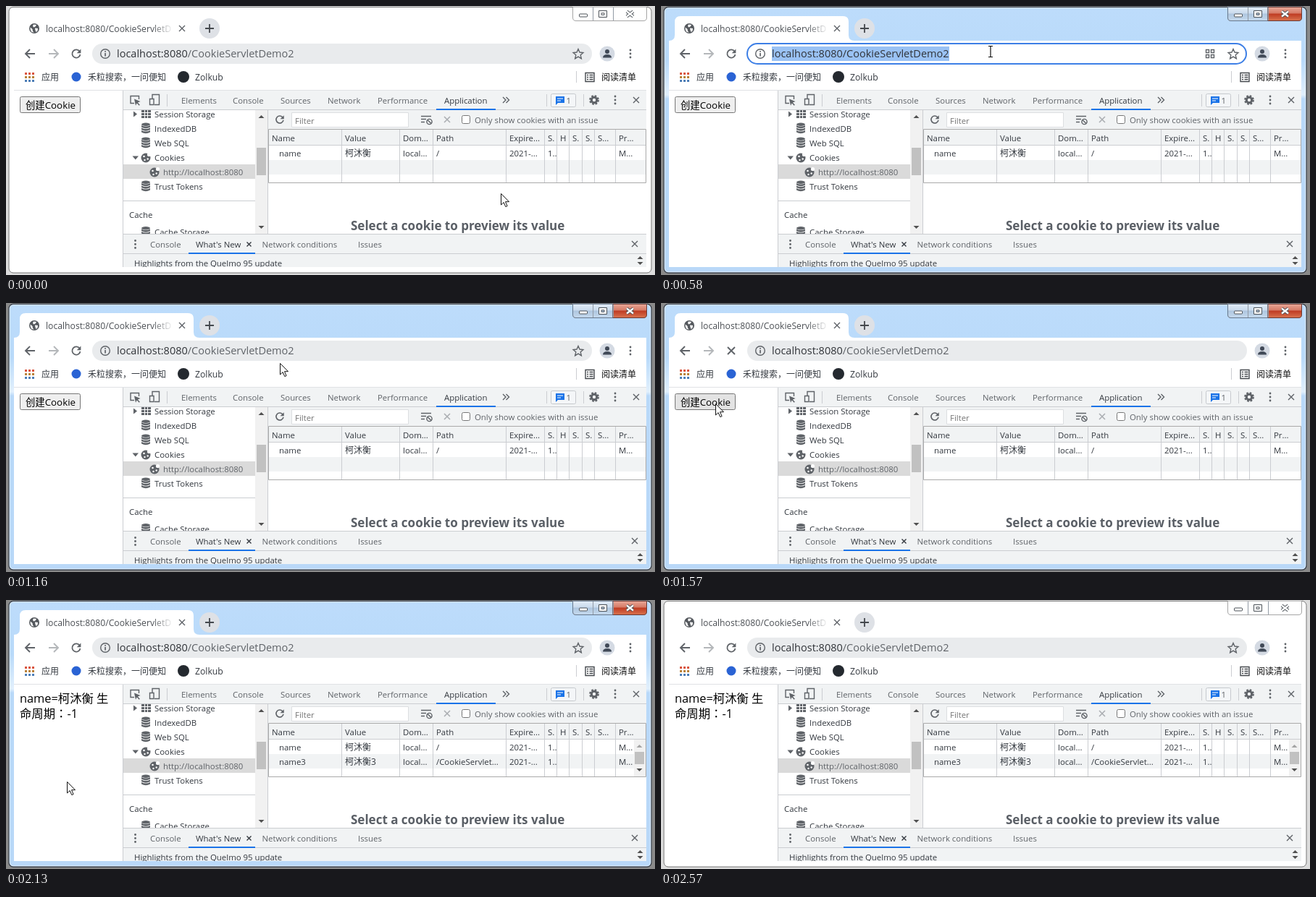
Write an HTML page that moves like this. It is 896 by 372 pixels and loops after 2.65 s.

```html
<!DOCTYPE html>
<html lang="zh-CN">
<head>
<meta charset="utf-8">
<title>Cookie demo</title>
<style>
html, body { margin: 0; width: 100%; height: 100%; overflow: hidden; background: #fff; }
svg { display: block; width: 100%; height: 100%; }
text { font: 11.4px "Open Sans", "Noto Sans CJK SC", "Noto Sans CJK", sans-serif; fill: #33383f; white-space: pre; }
.soft text, text.soft { fill: #5f6368; }
.t12 { font-size: 12.2px; }
.url { font-size: 14.5px; fill: #303338; }
.page { font-size: 16.35px; fill: #000; }
.mid { font-family: "Noto Sans CJK TC", "Noto Sans CJK", sans-serif; }
.btn { font-size: 13.33px; fill: #000; }
.head { font-size: 17px; font-weight: 700; fill: #5a5f66; }
.line { fill: none; stroke: #cbcdd1; }
.ico { fill: none; stroke: #5f6368; stroke-width: 1.4; }
.big { stroke-width: 1.9; }
.solid { fill: #5f6368; }

.active, .focus, .blur, .load, .idle, .row, .before, .after, .hover, .arrow, .beam, .cursor {
  animation: 2.65s step-end infinite;
}
.active { animation-name: active; }
.focus { animation-name: focus; }
.blur { animation-name: blur; }
.load { animation-name: load; }
.idle { animation-name: idle; }
.spin { animation: spin 2.65s step-end infinite; }
.globe { animation: globe 2.65s step-end infinite; }
.row { animation-name: row; }
.before { animation-name: before; }
.after { animation-name: after; }
.hover { animation-name: hover; }
.arrow { animation-name: arrow; }
.beam { animation-name: beam; }
.cursor { animation-name: move; }

@keyframes active { 0%, 96.981% { visibility: hidden } 21.887% { visibility: visible } }
@keyframes focus { 0%, 28.302% { visibility: hidden } 21.887% { visibility: visible } }
@keyframes blur { 0%, 28.302% { visibility: visible } 21.887% { visibility: hidden } }
@keyframes load { 0%, 34.528%, 64.906% { visibility: hidden } 28.302%, 59.057% { visibility: visible } }
@keyframes idle { 0%, 34.528%, 64.906% { visibility: visible } 28.302%, 59.057% { visibility: hidden } }
@keyframes spin { 0%, 34.528% { visibility: hidden } 28.302% { visibility: visible } }
@keyframes globe { 0%, 34.528% { visibility: visible } 28.302% { visibility: hidden } }
@keyframes row { 0%, 34.528% { visibility: visible } 31.509% { visibility: hidden } }
@keyframes before { 0% { visibility: visible } 67.925% { visibility: hidden } }
@keyframes after { 0% { visibility: hidden } 67.925% { visibility: visible } }
@keyframes hover { 0% { fill: #efefef } 59.057% { fill: #e3e3e3 } }
@keyframes arrow { 0%, 43.774% { visibility: visible } 15.472%, 88.679% { visibility: hidden } }
@keyframes beam { 0%, 43.774% { visibility: hidden } 15.472% { visibility: visible } }
@keyframes move {
  0% { transform: translate(683px, 259px) }
  2.642% { transform: translate(668px, 246px) }
  5.849% { transform: translate(616px, 202px) }
  9.057% { transform: translate(549px, 143px) }
  12.264% { transform: translate(492px, 93px) }
  15.472% { transform: translate(461px, 67px) }
  18.491% { transform: translate(455px, 63px) }
  37.736% { transform: translate(440px, 67px) }
  40.755% { transform: translate(405px, 76px) }
  43.774% { transform: translate(378px, 83px) }
  47.547% { transform: translate(346px, 112px) }
  50.377% { transform: translate(270px, 143px) }
  53.208% { transform: translate(180px, 155px) }
  56.226% { transform: translate(112px, 150px) }
  59.057% { transform: translate(75px, 139px) }
  62.075% { transform: translate(67px, 135px) }
  74.34% { transform: translate(69px, 152px) }
  77.17% { transform: translate(75px, 196px) }
  80% { transform: translate(84px, 251px) }
  82.83% { transform: translate(94px, 306px) }
  85.66% { transform: translate(101px, 352px) }
}
</style>
</head>
<body>
<svg viewBox="0 0 896 372">
<defs>
  <linearGradient id="aero" x2="0" y2="1">
    <stop stop-color="#bddcfb"/><stop offset=".2" stop-color="#b9dafa"/>
    <stop offset=".33" stop-color="#e2f0fd"/><stop offset=".345" stop-color="#b9d9f9"/><stop offset="1" stop-color="#b9d8f8"/>
  </linearGradient>
  <linearGradient id="glass" x2="0" y2="1">
    <stop stop-color="#e3edf8"/><stop offset=".45" stop-color="#c9daec"/><stop offset=".5" stop-color="#aec6df"/><stop offset="1" stop-color="#c6daee"/>
  </linearGradient>
  <linearGradient id="red" x2="0" y2="1">
    <stop stop-color="#e9a898"/><stop offset=".45" stop-color="#d67a66"/><stop offset=".5" stop-color="#bf3b22"/><stop offset="1" stop-color="#d9744f"/>
  </linearGradient>
  <linearGradient id="fade" gradientUnits="userSpaceOnUse" x1="202" x2="231" y1="0" y2="0">
    <stop stop-color="#4a4e53"/><stop offset="1" stop-color="#4a4e53" stop-opacity="0"/>
  </linearGradient>
  <clipPath id="side"><path d="M162 144H344V315H162z"/></clipPath>
  <clipPath id="foot"><path d="M162 344H884V361H162z"/></clipPath>
  <path id="x" d="M-4-4 4 4M4-4-4 4"/>
  <g id="dots"><circle cy="-5" r="1.4"/><circle r="1.4"/><circle cy="5" r="1.4"/></g>
  <g id="db" fill="#5f6368">
    <ellipse cy="-4.3" rx="6" ry="2.2"/>
    <path id="disc" d="M-6-3q6 3.200 12 0v2.600q-6 3.200-12 0z"/>
    <use href="#disc" y="3.500"/><use href="#disc" y="7"/>
  </g>
  <g id="cookie">
    <circle r="6.500" fill="#5f6368"/>
    <g fill="#fff"><circle cx="4.500" cy="-4.500" r="2.600"/><circle cx="-2.500" cy="-2" r="1.300"/><circle cx="-1.500" cy="3" r="1.200"/><circle cx="2.700" cy="1.500" r="1.200"/></g>
  </g>
  <g id="reload">
    <path d="M4.600-3.200A5.600 5.600 0 1 0 5.500 1" fill="none" stroke="#5f6368" stroke-width="1.800"/>
    <path d="M6.400-6.500v5.700H.7z" fill="#5f6368"/>
  </g>
  <path id="up" d="M-4 2 0-2 4 2z"/>
  <path id="down" d="M-4-2 0 2 4-2z"/>
</defs>

<!-- window frame and its shadow -->
<path d="M0 0H896V372H0z" fill="#dcdcdc"/>
<path class="active" d="M0 0H896V372H0z" fill="#8a8a8a"/>
<rect x="4" y="1.500" width="887" height="367.500" rx="6" fill="#fff" stroke="#777"/>
<g class="active">
  <rect x="4" y="1.500" width="887" height="367.500" rx="6" fill="url(#aero)" stroke="#3b424b" stroke-width="1.300"/>
  <rect x="5.200" y="2.700" width="884.600" height="365.100" rx="5" fill="none" stroke="#fff" stroke-opacity=".55"/>
</g>
<path d="M782.500 1.500V16q0 4.500 4.500 4.500H880q4.500 0 4.500-4.500V1.500" fill="#fff" stroke="#a5a5a5"/>
<g class="active" stroke="#67788c">
  <path d="M782.500 1.500V16q0 4.500 4.500 4.500H838V1.500z" fill="url(#glass)"/>
  <path d="M838 1.500V20.500H880q4.500 0 4.500-4.500V1.500z" fill="url(#red)" stroke="#6b3a35"/>
</g>
<path d="M810.500 2V20M838.500 2V20" stroke="#929aa5"/>
<g fill="#fff" stroke="#4d5359">
  <rect x="791.500" y="11" width="11" height="4" rx="1"/>
  <path d="M818.500 6.500h11v9h-11zM822 9.800v2.500h4V9.800z" fill-rule="evenodd"/>
  <g fill="none" transform="translate(861.500 11)">
    <path d="M-4.500-3.500 4.500 3.500M4.500-3.500-4.500 3.500" stroke-width="4.200"/>
    <path d="M-4.500-3.500 4.500 3.500M4.500-3.500-4.500 3.500" stroke="#fff" stroke-width="2.300"/>
  </g>
</g>

<!-- tab strip -->
<path d="M11 48q8 0 8-8V22q0-8 8-8H251q8 0 8 8V40q0 8 8 8H884V361H11z" fill="#fff"/>
<g class="globe">
  <circle cx="39" cy="31" r="7" fill="#55595e"/>
  <path d="M33.500 29.500l3 2.500.5 3 2 1.500-3.500-.5q-2.500-3-2-6.500zM38 25.500l4 .5-1.500 2.500-2.500 1-1-2zM40 30.500l4 .5-.5 3.500-2 1.500-1-2.500z" fill="#fff"/>
</g>
<circle class="spin" cx="39" cy="31" r="6" fill="none" stroke="#5f86c9" stroke-width="2" stroke-dasharray="26 12"/>
<text class="t12" x="55" y="35.500" style="fill:url(#fade)">localhost:8080/CookieServletD</text>
<use href="#x" x="243" y="31" class="ico"/>
<circle cx="281" cy="31" r="14" fill="#dee1e6"/>
<path d="M275 31h12M281 25v12" stroke="#45494e" stroke-width="1.800"/>

<!-- toolbar -->
<path class="ico big" d="M40 66H27.500M33 60l-6 6 6 6"/>
<path d="M59 66H71.500M66 60l6 6-6 6" fill="none" stroke="#b4b7ba" stroke-width="1.900"/>
<use class="idle" href="#reload" x="97" y="66"/>
<path class="ico big load" d="M92 61l10 10M102 61l-10 10"/>
<rect x="119" y="52" width="690" height="28" rx="14" fill="#e9ebed"/>
<g class="focus">
  <rect x="119" y="52" width="689" height="28" rx="14" fill="#fff" stroke="#3d7fe6" stroke-width="2"/>
  <path d="M153 56H398V76H153z" fill="#9ac2f4"/>
  <text class="url" x="153" y="71">localhost:8080/CookieServletDemo2</text>
  <path d="M752.500 60.500h4v4h-4zM759.500 60.500h4v4h-4zM752.500 67.500h4v4h-4zM759.500 67.500h4v4h-4z" class="ico"/>
</g>
<text class="url blur" x="153" y="71">localhost:8080<tspan fill="#5f6368">/CookieServletDemo2</tspan></text>
<circle cx="137" cy="66" r="6.300" class="ico"/>
<path d="M136.200 65h1.700v4.500h-1.700zM136.200 62h1.700v1.700h-1.700z" class="solid"/>
<path class="ico idle" d="M790 59.500l2 4.500 4.900.5-3.700 3.300 1.100 4.900-4.300-2.600-4.300 2.600 1.100-4.900-3.700-3.300 4.900-.5z"/>
<circle cx="830" cy="66" r="10.500" fill="#d4dae3"/>
<circle cx="830" cy="63" r="3" fill="#414a58"/>
<path d="M824 71.500q0-4.500 6-4.500t6 4.500z" fill="#414a58"/>
<use href="#dots" x="862" y="66" class="solid"/>

<!-- bookmarks -->
<g fill="none" stroke-width="3" stroke-dasharray="3 2">
  <path d="M26 93.500h13" stroke="#d9553f"/><path d="M26 98.500h13" stroke="#b9823a"/><path d="M26 103.500h13" stroke="#4e7fb8"/>
</g>
<text x="49" y="102.500" style="font-size:12px">应用</text>
<circle cx="97" cy="98" r="6.500" fill="#2a63d4"/>
<text x="113" y="102.500" style="font-size:12px">禾粒搜索，一问便知</text>
<circle cx="245" cy="98" r="8" fill="#24292f"/>
<text class="t12" x="261" y="102.500">Zolkub</text>
<path class="line" d="M787.500 90v16"/>
<path class="ico" d="M800 92.500h12v12h-12zM802 95.500h2M805.500 95.500h5M802 98.500h2M805.500 98.500h5M802 101.500h2M805.500 101.500h5" style="stroke:#45494e"/>
<text x="822" y="102.500" style="font-size:12px;fill:#111">阅读清单</text>
<path d="M11 116.500H884" stroke="#e0e2e5"/>

<!-- page -->
<g class="before">
  <rect class="hover" x="19.500" y="125.500" width="83" height="22" rx="2" fill="#efefef" stroke="#767676"/>
  <text class="btn" x="27" y="142">创建Cookie</text>
</g>
<g class="after">
  <text class="page" x="19" y="142">name=柯沐衡 生</text>
  <text class="page" x="19" y="163">命周期<tspan class="mid" lang="zh-TW">：</tspan>-1</text>
</g>

<!-- inspector tabs -->
<path d="M162 117H884V143H162z" fill="#f1f3f4"/>
<path class="line" d="M161.500 117V361M162 143.500H884M222.500 122v17M746.500 122v17M797.500 122v17"/>
<path class="ico" d="M183.500 129v-4.500h-11.500v10h5"/>
<path d="M177 128.500l8.500 3.500-3.600 1.500 3 3.200-1.200 1.100-3-3.300-1.700 3.200z" class="solid"/>
<path class="ico" d="M202 128v-5.500h9.500v14H205M198.500 128.500h5.500v8h-5.500z"/>
<g class="soft">
  <text x="242" y="134.500">Elements</text><text x="313" y="134.500">Console</text><text x="379" y="134.500">Sources</text>
  <text x="444" y="134.500">Network</text><text x="513" y="134.500">Performance</text>
</g>
<text x="605" y="134.500">Application</text>
<path d="M594 142H676V144H594z" fill="#1a73e8"/>
<path class="ico" d="M686 126l4 4-4 4M690.500 126l4 4-4 4"/>
<rect x="752.500" y="121.500" width="34" height="18" rx="2" fill="#f4f6f8" stroke="#c6c9cd"/>
<path d="M759 125h12v9h-9l-3 3z" fill="#1a73e8"/>
<path d="M761 128h8M761 131h5" stroke="#fff"/>
<text class="soft" x="773.500" y="134.500">1</text>
<circle cx="812" cy="130" r="5.700" fill="none" stroke="#5f6368" stroke-width="2.400" stroke-dasharray="2.600 1.877"/>
<circle cx="812" cy="130" r="3.700" fill="none" stroke="#5f6368" stroke-width="3"/>
<use href="#dots" x="841" y="130" class="solid"/>
<use href="#x" x="870" y="130" class="ico"/>

<!-- storage tree -->
<g clip-path="url(#side)">
  <path d="M162 219H344V239H162z" fill="#dadada"/>
  <path d="M176 145.500l5 4-5 4zM174.500 207.500h8.500l-4.200 5z" class="solid"/>
  <path d="M187 144h13v11h-13z" class="solid"/>
  <path d="M187 147.500h13M187 151.500h13M191.500 144v11M195.500 144v11" stroke="#fff"/>
  <use href="#db" x="193" y="168"/><use href="#db" x="193" y="188"/>
  <use href="#db" x="193" y="248"/><use href="#db" x="193" y="311.500"/>
  <use href="#cookie" x="193" y="210"/><use href="#cookie" x="205" y="230"/>
  <text x="205" y="154">Session Storage</text><text x="205" y="174">IndexedDB</text><text x="205" y="194">Web SQL</text>
  <text x="205" y="214">Cookies</text><text class="soft" x="217" y="234">http://localhost:8080</text><text x="205" y="254">Trust Tokens</text>
  <text x="170" y="293">Cache</text><text x="205" y="317">Cache Storage</text>
  <path class="line" d="M162 269.500H344"/>
</g>
<path d="M344 144H361V315H344z" fill="#f1f1f1"/>
<path d="M346 196H359V234H346z" fill="#c1c1c1"/>
<use href="#up" x="352.500" y="153" fill="#505050"/><use href="#down" x="352.500" y="306" fill="#505050"/>

<!-- cookie filter bar -->
<path d="M362 144H884V193H362z" fill="#f1f3f4"/>
<use href="#reload" x="378" y="157" transform="translate(37.800 15.700) scale(.9)"/>
<path d="M394.500 147.500H555.500V167.500H394.500z" fill="#fff" stroke="#dcdee1"/>
<text x="399" y="163" style="fill:#757575">Filter</text>
<path class="ico" d="M573 152.500h14M573 156.500h7M573 160.500h5"/>
<circle class="ico" cx="584.500" cy="160" r="3.600"/>
<path class="ico" d="M582 157.500l5 5"/>
<use href="#x" x="609" y="157" fill="none" stroke="#a9acb0" stroke-width="1.500"/>
<rect x="629.500" y="151.500" width="11" height="11" rx="2" fill="#fff" stroke="#767676"/>
<text class="soft" x="647" y="162">Only show cookies with an issue</text>

<!-- cookie table -->
<path d="M362 213H884V233H362z" fill="#f1f3f4"/>
<path class="line" d="M361.500 144V315M362 192.500H884M463.500 171V245M543.500 171V245M589.500 171V245M690.500 171V245M743.500 171V245M760.500 171V245M777.500 171V245M795.500 171V245M812.500 171V245M841.500 171V245"/>
<path d="M362.500 170.500H883.500V244.500H362.500z" fill="none" stroke="#aaa"/>
<text y="187"><tspan x="367">Name</tspan><tspan x="468">Value</tspan><tspan x="548">Dom...</tspan><tspan x="594">Path</tspan><tspan x="695">Expire...</tspan><tspan x="748">S.</tspan><tspan x="765">H</tspan><tspan x="782">S.</tspan><tspan x="800">S.</tspan><tspan x="817">S...</tspan><tspan x="846">Pr...</tspan></text>
<text class="row" y="207.500"><tspan x="377">name</tspan><tspan x="468" font-size="12">柯沐衡</tspan><tspan x="548">local...</tspan><tspan x="594">/</tspan><tspan x="695">2021-...</tspan><tspan x="748">1..</tspan><tspan x="846">M...</tspan></text>
<g class="after">
  <text y="227.500"><tspan x="377">name3</tspan><tspan x="468" font-size="12">柯沐衡3</tspan><tspan x="548">local...</tspan><tspan x="594">/CookieServlet...</tspan><tspan x="695">2021-...</tspan><tspan x="748">1..</tspan><tspan x="846">M...</tspan></text>
  <path d="M867 193H883V244H867z" fill="#f1f1f1"/>
  <path d="M868 210H881V227H868z" fill="#c1c1c1"/>
  <use href="#up" x="874.500" y="202" fill="#a3a3a3"/><use href="#down" x="874.500" y="235" fill="#505050"/>
</g>
<text class="head" x="476" y="309.500">Select a cookie to preview its value</text>

<!-- drawer -->
<path d="M162 315H884V361H162z" fill="#f1f3f4"/>
<path class="line" d="M162 315.500H884M162 342.500H884"/>
<use href="#dots" x="178.500" y="329.500" class="solid"/>
<g class="soft">
  <text x="199" y="334">Console</text><text x="353.500" y="334">Network conditions</text><text x="486" y="334">Issues</text>
</g>
<text x="262" y="334">What's New</text>
<path d="M252 341H344V343H252z" fill="#1a73e8"/>
<path class="ico" d="M332.500 326.500l6 6M338.500 326.500l-6 6" style="stroke:#33383f"/>
<use href="#x" x="868" y="329" class="ico"/>
<g clip-path="url(#foot)">
  <text x="177" y="360.300">Highlights from the Quelmo 95 update</text>
  <use href="#up" x="875.500" y="348" fill="#505050"/><use href="#down" x="875.500" y="356" fill="#505050"/>
</g>

<!-- pointer -->
<g class="cursor">
  <path class="arrow" d="M.5.500V16l3.600-3.400 2.700 6 2.300-1-2.600-5.900h5z" fill="#fff" stroke="#111"/>
  <path class="beam" d="M-3-7.500h2.500l.5.800.5-.8H3M0-7V7M-3 7.500h2.500l.5-.8.5.8H3" fill="none" stroke="#111" stroke-width="1.200"/>
</g>
</svg>
</body>
</html>
```
